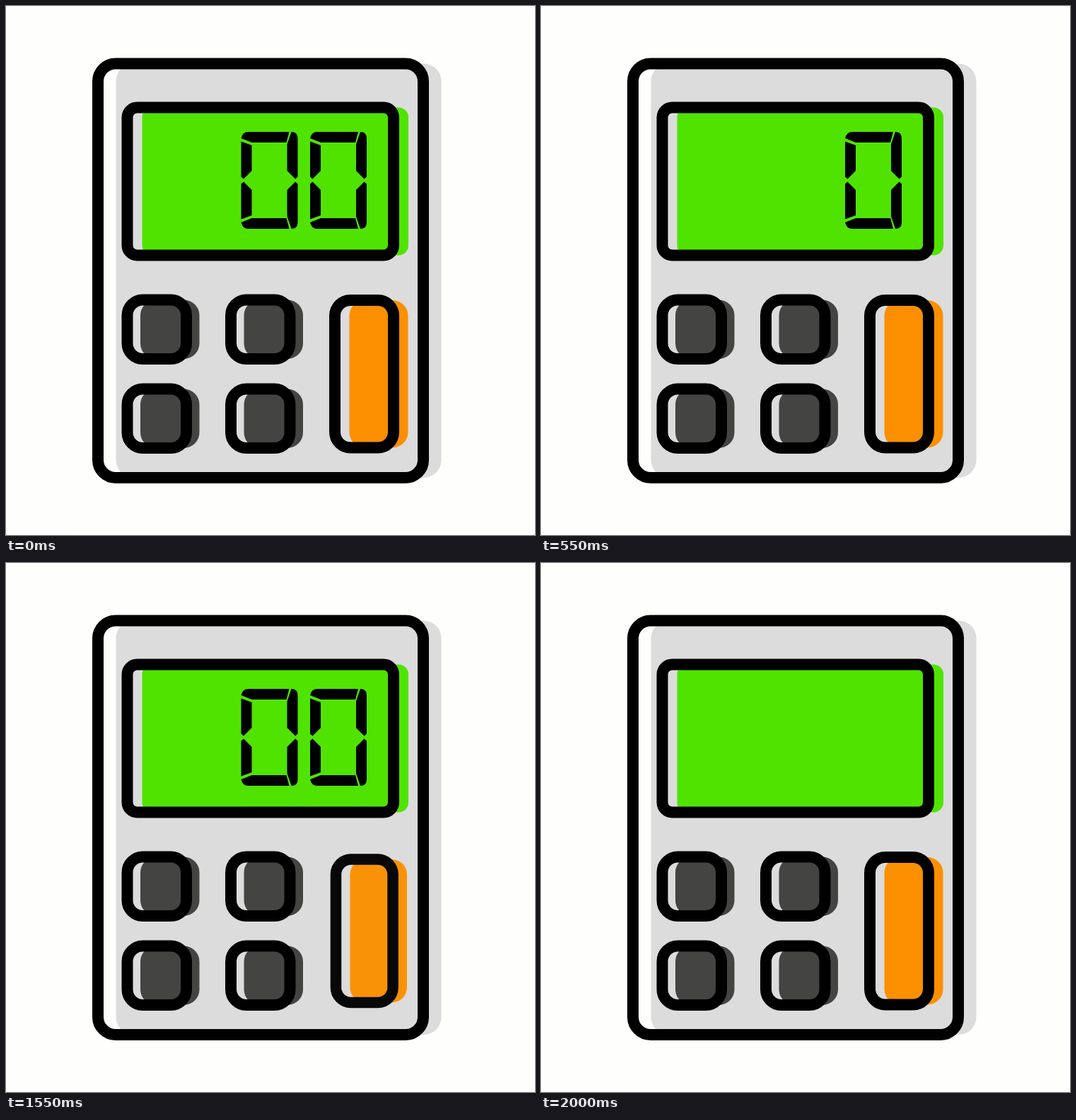
An HTML page with a canvas that plays this animation: 748 px wide and 748 px high, repeating every 2.05 s.

```html
<!DOCTYPE html>
<html lang="en">
<head>
<meta charset="utf-8">
<title>Calculator</title>
<style>
html, body { margin: 0; width: 100%; height: 100%; overflow: hidden; background: #fefefd; }
canvas { display: block; width: 748px; height: 748px; }
</style>
</head>
<body>
<canvas id="stage" width="748" height="748"></canvas>
<script>
const ctx = document.getElementById('stage').getContext('2d');
const LOOP = 2050, STEP = 50;
const PRESSES = [0, 700, 1490];
const PAPER = [254, 254, 253], BODY = [220, 220, 221], INK = [0, 0, 0];
const GREEN = [80, 227, 0], GREY = [68, 68, 67], ORANGE = [251, 143, 0];

const clamp = u => Math.min(1, Math.max(0, u));
const smooth = u => (1 - Math.cos(Math.PI * clamp(u))) / 2;
const rgb = c => `rgb(${c.map(Math.round).join(',')})`;
const mix = (a, b, u) => a.map((v, i) => v + (b[i] - v) * u);

// 0 at rest, 1 fully pressed
function press(t, start) {
  const d = t - start;
  return d < 250 ? smooth(d / 200) : 1 - smooth((d - 250) / 250);
}

function scaled(cx, cy, s, draw) {
  ctx.save();
  ctx.translate(cx, cy);
  ctx.scale(s, s);
  ctx.translate(-cx, -cy);
  draw();
  ctx.restore();
}

function box(x, y, w, h, r) {
  ctx.beginPath();
  ctx.roundRect(x, y, w, h, r);
}

// Filled panel shifted sideways under its outline
function panel(x, y, w, h, r, shift, fill, ink = INK) {
  ctx.fillStyle = rgb(fill);
  box(x + shift, y, w, h, r);
  ctx.fill();
  ctx.strokeStyle = rgb(ink);
  ctx.lineWidth = 16;
  box(x, y, w, h, r);
  ctx.stroke();
}

function button(x, y, w, h, shift, fill, p, cx) {
  const fade = 0.17 * p;
  scaled(cx, y + h / 2, 1 - 0.14 * p, () =>
    panel(x, y, w, h, 22, shift, mix(fill, BODY, fade), mix(INK, BODY, fade)));
}

function poly(points) {
  points.forEach(([x, y], i) => i ? ctx.lineTo(x, y) : ctx.moveTo(x, y));
  ctx.closePath();
}

function halfZero() {
  ctx.beginPath();
  ctx.moveTo(-40, -59.5);
  ctx.quadraticCurveTo(-38, -68.5, -30, -68.5);
  ctx.lineTo(28, -68.5);
  ctx.lineTo(24, -53.5);
  ctx.lineTo(-25, -53.5);
  ctx.closePath();
  poly([[-40, -55], [-25, -49.5], [-25, -13.5], [-36.5, -2], [-40, -5]]);
  ctx.moveTo(31, -68.5);
  ctx.quadraticCurveTo(40, -68.5, 40, -59.5);
  ctx.lineTo(40, -5);
  ctx.lineTo(36.5, -2);
  ctx.lineTo(25, -13.5);
  ctx.lineTo(25, -51);
  ctx.closePath();
  ctx.fill();
}

function zero(cx, s) {
  ctx.save();
  ctx.translate(cx, 246.5);
  ctx.scale(s, s);
  ctx.fillStyle = rgb(INK);
  halfZero();
  ctx.scale(1, -1);
  halfZero();
  ctx.restore();
}

function digits(t) {
  const xs = [470, 372.5];
  if (t < STEP) return xs.forEach(x => zero(x, 1));
  if (t >= PRESSES[2] + 200) return;
  xs.forEach((x, i) => {
    const d = t - PRESSES[i] - 200;
    if (d > 0) zero(x, 1 - 0.15 * (1 - clamp(d / 200)) ** 3);
  });
}

function draw(t) {
  ctx.fillStyle = rgb(PAPER);
  ctx.fillRect(0, 0, 748, 748);
  panel(130, 81.5, 460, 585.5, 25, 25.5, BODY);
  panel(171.5, 143.5, 376.5, 209, 14, 21, GREEN);
  digits(t);
  const key = Math.max(press(t, PRESSES[0]), press(t, PRESSES[1]));
  for (let i = 0; i < 4; i++) {
    const x = 171.5 + 146.5 * (i % 2), y = 415.5 + 126 * (i >> 1);
    button(x, y, 83.5, 83.5, 18.5, GREY, i === 2 ? key : 0, x + 50.5);
  }
  button(465, 416, 83, 208.5, 20.5, ORANGE, press(t, PRESSES[2]), 516);
}

const begin = performance.now();
function tick() {
  const t = (performance.now() - begin) % LOOP;
  draw(Math.floor(t / STEP) * STEP);
  requestAnimationFrame(tick);
}
tick();
</script>
</body>
</html>
```
